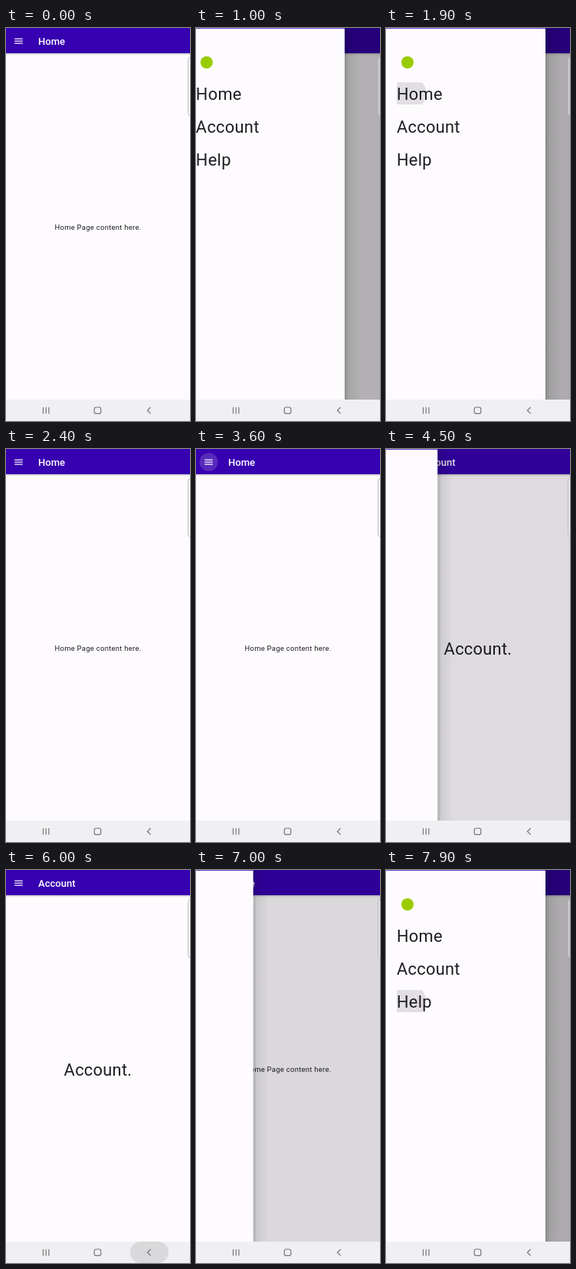
Recreate the animation shown at these times as an HTML page with a canvas. Size 240 by 514 pixels, loop 8000 ms.

```html
<!DOCTYPE html>
<html lang="en">
<head>
<meta charset="utf-8">
<title>Navigation drawer</title>
<style>
  html, body { margin: 0; width: 100%; height: 100%; overflow: hidden; background: #fefbff; }
  canvas { display: block; width: 240px; height: 514px; }
</style>
</head>
<body>
<canvas id="stage"></canvas>
<script>
const W = 240, H = 514, NAV_Y = 486, BAR_H = 33, DRAWER_W = 208;
const LOOP = 8000, STEP = 100, SLIDE = 256;
const PAPER = '#fefbff', INK = '#1f1d21', PURPLE = '#3700b0';

const canvas = document.getElementById('stage');
const ctx = canvas.getContext('2d');
const ratio = window.devicePixelRatio || 1;
canvas.width = Math.round(W * ratio);
canvas.height = Math.round(H * ratio);
ctx.scale(ratio, ratio);

const slides = [
  { at: 824, open: true }, { at: 1989, open: false },
  { at: 3624, open: true }, { at: 4389, open: false },
  { at: 6924, open: true }
];
const items = [
  { label: 'Home', y: 94, width: 60, taps: [[1900, 2100]] },
  { label: 'Account', y: 137, width: 83, taps: [[4400, 4500]] },
  { label: 'Help', y: 180, width: 46, taps: [[7900, 8000]] }
];
const menuTaps = [[800, 1000], [3600, 3800], [6900, 7100]];

const within = (t, spans) => spans.some(([from, to]) => t >= from && t < to);

// Cubic bezier (.4, 0, .2, 1)
function ease(x) {
  if (x <= 0) return 0;
  if (x >= 1) return 1;
  let lo = 0, hi = 1, u = 0.5;
  for (let i = 0; i < 24; i++) {
    u = (lo + hi) / 2;
    const v = 1 - u;
    if (1.2 * v * v * u + 0.6 * v * u * u + u ** 3 < x) lo = u; else hi = u;
  }
  return u * u * (3 - 2 * u);
}

function openness(t) {
  const slide = slides.filter(s => s.at <= t).pop();
  if (!slide) return 0;
  const p = ease((t - slide.at) / SLIDE);
  return slide.open ? p : 1 - p;
}

function rect(x, y, w, h, color) {
  ctx.fillStyle = color;
  ctx.fillRect(x, y, w, h);
}

function disc(x, y, r, color) {
  ctx.fillStyle = color;
  ctx.beginPath();
  ctx.arc(x, y, r, 0, Math.PI * 2);
  ctx.fill();
}

function text(str, x, y, size, { color = INK, weight = 400, spacing = 0.295, align = 'left' } = {}) {
  ctx.font = `${weight} ${size}px Roboto, sans-serif`;
  ctx.letterSpacing = spacing + 'px';
  ctx.textAlign = align;
  ctx.fillStyle = color;
  ctx.fillText(str, x, y);
}

function shade(x, y, w, h, dx, dy, alpha) {
  const g = ctx.createLinearGradient(x, y, x + dx, y + dy);
  g.addColorStop(0, `rgba(0,0,0,${alpha})`);
  g.addColorStop(1, 'rgba(0,0,0,0)');
  rect(x, y, w, h, g);
}

function drawPage(t) {
  const account = t >= 4450 && t < 6100;
  rect(0, 0, W, H, PAPER);
  shade(0, BAR_H, W, 3, 0, 3, 0.2);
  rect(0, 0, W, BAR_H, PURPLE);
  if (within(t, menuTaps)) disc(16.5, 17, 12, 'rgba(255,255,255,.16)');
  for (let i = -1; i <= 1; i++) rect(11.2, 16.5 + i * 2.95, 10.6, 1.2, '#fff');
  text(account ? 'Account' : 'Home', 42, 22, 13, { color: '#fff', weight: 500, spacing: 0 });
  if (account) text('Account.', 120, 268.5, 21.8, { align: 'center' });
  else text('Home Page content here.', 120, 264, 9.44, { align: 'center' });
}

function drawDrawer(t, p) {
  if (p < 0.002) return;
  rect(0, 0, W, NAV_Y, `rgba(0,0,0,${0.32 * p ** 0.8})`);
  const edge = DRAWER_W * p;
  shade(edge, 1, 5, NAV_Y - 1, 5, 0, 0.14);
  shade(edge, 1, 20, NAV_Y - 1, 20, 0, 0.09);
  rect(0, 0, edge, 1, '#6a45c8');

  ctx.save();
  ctx.translate(edge - DRAWER_W, 0);
  rect(0, 1, DRAWER_W, NAV_Y - 1, PAPER);
  disc(28, 45, 8, '#99cc00');
  for (const { label, y, width, taps } of items) {
    if (within(t, taps)) {
      ctx.save();
      ctx.beginPath();
      ctx.rect(14, y - 23, width, 29);
      ctx.clip();
      disc(31, y - 8.5, 21.5, '#e1dfe2');
      ctx.restore();
    }
    text(label, 14, y, 21.8);
  }
  ctx.restore();
}

function drawEdgeHandle() {
  ctx.beginPath();
  ctx.roundRect(237.5, 38.5, 12, 76, 3);
  ctx.fillStyle = 'rgba(255,255,255,.35)';
  ctx.fill();
  ctx.strokeStyle = '#bdbbbe';
  ctx.lineWidth = 1;
  ctx.stroke();
}

function drawNav(t) {
  rect(0, NAV_Y, W, H - NAV_Y, '#f0eff1');
  if (t >= 6000 && t < 6500) {
    const step = Math.min(2, (t - 6000) / STEP);
    const half = 25 + step * 5;
    ctx.fillStyle = ['#d9d8da', '#dedde0', '#e8e7e9'][step];
    ctx.beginPath();
    ctx.roundRect(187 - half, NAV_Y, half * 2, H - NAV_Y, 14);
    ctx.fill();
  }
  ctx.strokeStyle = '#77767a';
  ctx.lineWidth = 1.2;
  ctx.beginPath();
  for (const x of [48.5, 52.2, 55.9]) {
    ctx.moveTo(x, 496);
    ctx.lineTo(x, 504.5);
  }
  ctx.roundRect(115.2, 496, 8.6, 8.4, 2.4);
  ctx.moveTo(188.7, 496);
  ctx.lineTo(184.4, 500.2);
  ctx.lineTo(188.7, 504.4);
  ctx.stroke();
}

function frame(now) {
  const t = Math.floor((now % LOOP) / STEP) * STEP;
  drawPage(t);
  drawDrawer(t, openness(t));
  drawEdgeHandle();
  drawNav(t);
}

const start = performance.now();
function tick() {
  frame(performance.now() - start);
  requestAnimationFrame(tick);
}
tick();
</script>
</body>
</html>
```
